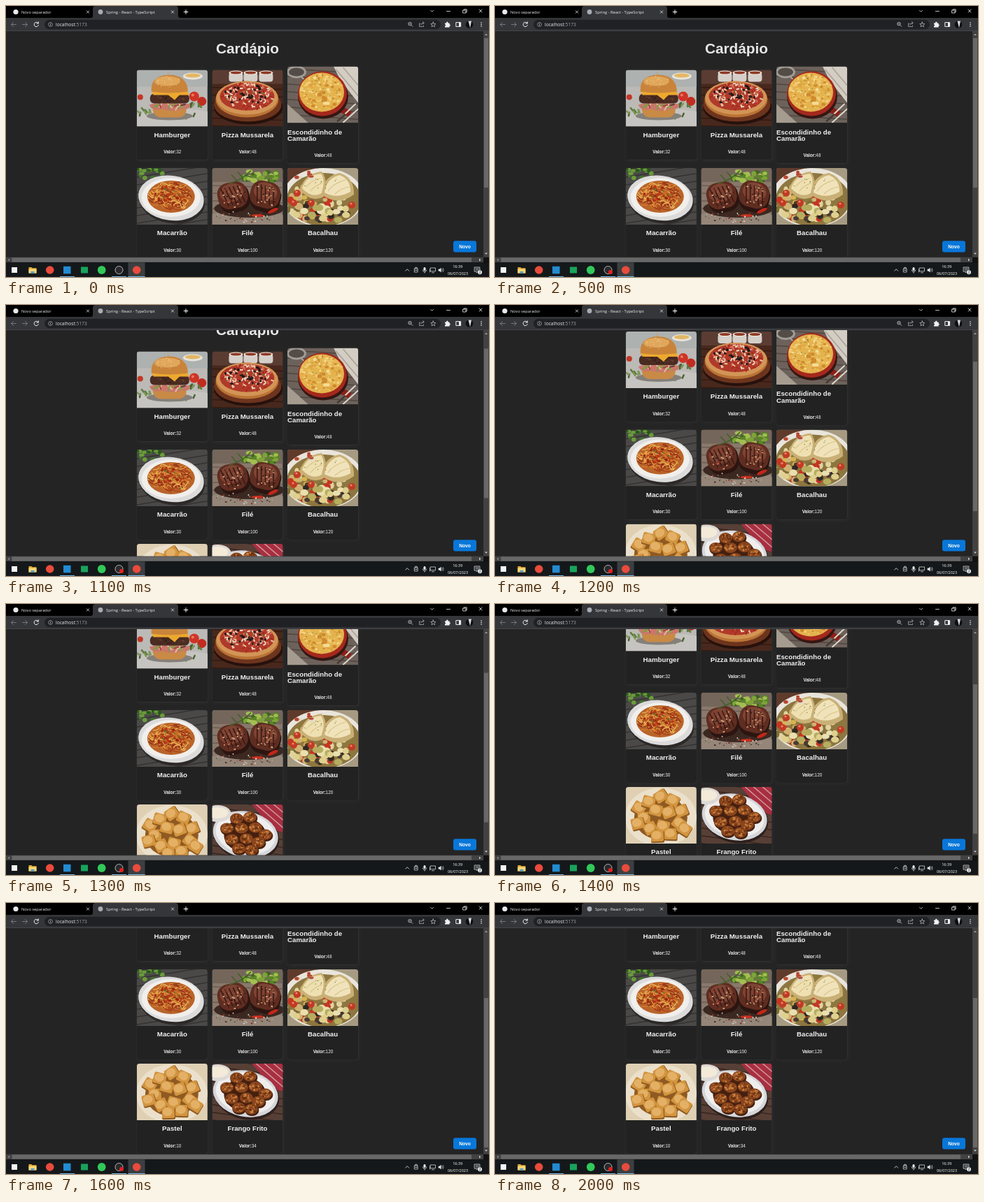
Write an HTML page that moves like this. It is 690 by 388 pixels and loops after 2.7 s.

```html
<!DOCTYPE html>
<html lang="pt">
<head>
<meta charset="utf-8">
<title>Cardápio</title>
<style>
html, body { margin: 0; width: 100%; height: 100%; overflow: hidden; background: #000; }
svg { display: block; width: 100vw; height: 100vh; }
text { font-family: "Open Sans", sans-serif; font-weight: 500; }
.page text { font-family: "Liberation Sans", Arial, sans-serif; font-weight: bold; }
.page .num { font-weight: normal; }
.line { fill: none; stroke-linecap: round; stroke-linejoin: round; }
</style>
</head>
<body>
<svg id="stage" viewBox="0 0 690 388"></svg>
<script>
let seed = 7;
const rnd = (a = 0, b = 1) => {
  seed = (seed * 16807) % 2147483647;
  return a + (b - a) * seed / 2147483647;
};
const pick = list => list[Math.floor(rnd(0, list.length))];

const rect = (x, y, w, h, fill, more = '') =>
  `<rect x="${x}" y="${y}" width="${w}" height="${h}" fill="${fill}" ${more}/>`;
const oval = (x, y, rx, ry, fill, more = '') =>
  `<ellipse cx="${x}" cy="${y}" rx="${rx}" ry="${ry}" fill="${fill}" ${more}/>`;
const dot = (x, y, r, fill, more) => oval(x, y, r, r, fill, more);
const shape = (d, fill, more = '') => `<path d="${d}" fill="${fill}" ${more}/>`;
const line = (d, color = '#e8eaed', w = 0.8) =>
  `<path class="line" d="${d}" stroke="${color}" stroke-width="${w}"/>`;
const text = (x, y, size, s, fill = '#fff', more = '') =>
  `<text x="${x}" y="${y}" font-size="${size}" fill="${fill}" ${more}>${s}</text>`;
const mid = 'text-anchor="middle"';
const turn = (a, x, y) => `transform="rotate(${a} ${x} ${y})"`;

// n pieces spread at random over an ellipse
function scatter(n, cx, cy, rx, ry, piece) {
  let out = '';
  for (let i = 0; i < n; i++) {
    const a = rnd(0, 6.283), r = Math.sqrt(rnd());
    out += piece(cx + rx * r * Math.cos(a), cy + ry * r * Math.sin(a));
  }
  return out;
}
const dots = (colors, lo, hi) => (x, y) => oval(x, y, rnd(lo, hi), rnd(lo, hi) * 0.85, pick(colors));
const bits = (colors, w, h) => (x, y) =>
  rect(x - w / 2, y - h / 2, w, h, pick(colors), 'rx="1" ' + turn(rnd(0, 180), x, y));
const planks = (base, seam, tilt) => {
  let out = rect(0, 0, 101, 81, base);
  for (let y = -30; y < 120; y += 11) out += line(`M-5 ${y}L106 ${y + tilt}`, seam, 1.5);
  return out;
};

// Each dish is painted on a 101 x 81 picture
function burger() {
  const leaf = bits(['#5d7a3a', '#7c9656', '#48642f'], 7, 2.5);
  return rect(0, 0, 101, 81, '#bbbab6') + rect(0, 0, 101, 24, '#adb1b0') +
    oval(60, 74, 70, 18, '#c6c4c0') +
    oval(80, 9, 14, 5, '#e9e4da') + oval(80, 8, 11, 3, '#e3b765') +
    dot(5, 39, 4, '#c33626') +
    dot(82, 38, 7, '#cf3426') + dot(93, 45, 6.5, '#c22c20') + dot(80, 36, 2, '#e97a60') +
    scatter(6, 78, 52, 13, 4, leaf) + scatter(7, 10, 62, 11, 6, leaf) + scatter(4, 74, 66, 14, 4, leaf) +
    oval(47, 66, 33, 6, '#85807a') +
    shape('M23 53H71Q72 67 60 68H35Q22 67 23 53Z', '#c98a45') +
    shape('M18 50Q30 45 76 49Q78 57 65 56Q50 61 36 56Q22 60 18 50Z', '#c9776b') +
    scatter(16, 47, 52, 27, 3, bits(['#7f9b45', '#a24340', '#e5b7a2', '#5c4030'], 8, 2)) +
    rect(19, 34, 56, 14, '#4b2c22', 'rx="6"') +
    scatter(24, 47, 41, 24, 5, dots(['#623c2c', '#372019'], 0.8, 2)) +
    shape('M21 31L72 30L75 36L61 36L54 43L45 36L24 36Z', '#eda92e') +
    shape('M21 31Q19 8 46 7Q73 8 73 31Q48 35 21 31Z', '#c9843a') +
    oval(44, 16, 18, 7, '#e0a75b') +
    scatter(22, 45, 17, 20, 8, dots(['#f0d8a4'], 0.4, 0.8)) + line('M45 2V7', '#c9a25a', 1);
}
function pizza() {
  return planks('#48281d', '#35190f', 3) + rect(0, 0, 101, 20, '#5b3c32') +
    [34, 55, 77].map(x => rect(x - 10, 4, 20, 13, '#d5cfca', 'rx="4"') +
      oval(x, 4, 10, 3, '#f2efeb') + oval(x, 4, 8, 2, '#8f3a25')).join('') +
    oval(52, 54, 49, 24, '#26110c') + oval(51, 50, 48, 24, '#6d341d') +
    oval(50, 42, 45, 26, '#b97335') + oval(50, 40, 44, 24, '#d29556') + oval(50, 38, 39, 20, '#b03a2a') +
    scatter(120, 50, 38, 38, 19, bits(['#e9c8a8', '#efdcc8', '#d8705a', '#a82a1d'], 5, 2)) +
    scatter(28, 50, 38, 35, 17, dots(['#211918', '#33211e'], 1.4, 2.6)) +
    scatter(9, 50, 38, 30, 14, dots(['#74793a'], 0.8, 1.5));
}
function gratin() {
  return planks('#6d625b', '#50463f', 7) + shape('M66 0H101V52L76 20Z', '#d3cdc3') +
    line('M70 5L101 42M80 2L101 27', '#aaa196', 1.5) +
    oval(13, 8, 14, 9, '#a09c96') + oval(13, 8, 11, 6, '#544c46') + line('M20 15L31 25', '#aaa69e', 2) +
    shape('M0 54L30 81H0Z', '#a59b8f') +
    shape('M70 52L92 65L87 72L62 58Z', '#8c2018') +
    oval(51, 43, 36, 32, '#351713') + oval(50, 39, 35, 32, '#a5281d') + oval(49, 37, 32, 28, '#e4b34d') +
    scatter(130, 49, 36, 30, 26, dots(['#f0cb73', '#dfa341', '#f5dc97', '#edc464', '#d08a2e'], 1, 3)) +
    scatter(14, 49, 36, 24, 20, dots(['#7b8237'], 0.5, 1)) +
    line('M72 78L97 54M80 80L101 61', '#dcd6cb', 2) + line('M72 78L82 69', '#463b33', 3);
}
function pasta() {
  return planks('#4b4948', '#343231', -18) +
    scatter(24, 16, 6, 23, 9, dots(['#42722b', '#6a9b3b', '#2c5320'], 2, 4)) +
    oval(51, 47, 47, 32, '#2c2928', turn(8, 50, 44)) +
    oval(49, 43, 47, 32, '#dcdbdb', turn(8, 50, 44)) + oval(49, 42, 42, 28, '#f1efec') +
    oval(49, 41, 34, 23, '#b9642a') +
    scatter(120, 49, 40, 28, 19, (x, y) =>
      line(`M${x - 6} ${y}q${rnd(0, 8)} ${rnd(-10, 10)} ${rnd(7, 13)} ${rnd(-5, 5)}`,
        pick(['#e6a043', '#d67c2c', '#f0b95c', '#a53c17', '#8f2c14']), 1.2)) +
    scatter(30, 49, 38, 24, 15, dots(['#98260f', '#b93618'], 1, 2.5)) +
    scatter(8, 50, 36, 18, 9, dots(['#4d7a2c'], 0.8, 1.5));
}
function steak() {
  const slab = (x, y, a) => `<g ${turn(a, x, y)}>` +
    rect(x - 21, y - 17, 44, 41, '#2c1510', 'rx="17"') + rect(x - 22, y - 20, 43, 38, '#5f2d21', 'rx="16"') +
    oval(x - 1, y - 5, 17, 13, '#7d4534') +
    [-12, -6, 0, 6, 12].map(d => line(`M${x + d - 3} ${y - 13}L${x + d + 3} ${y + 12}`, '#3d1c16', 1.8)).join('') +
    scatter(40, x, y, 18, 17, dots(['#b57555', '#8c3324', '#d0a078', '#35160f'], 0.5, 1.8)) + '</g>';
  return planks('#89796c', '#6c5d52', 3) + rect(0, 0, 101, 20, '#75665b') + oval(50, 74, 58, 15, '#95867a') +
    scatter(38, 70, 13, 27, 11, dots(['#7da436', '#5a8428', '#a2bf50', '#3e6420'], 2, 5)) +
    oval(53, 58, 50, 13, '#3a2821') + slab(76, 39, 14) + slab(30, 40, -12) +
    line('M25 22Q45 16 55 4M35 18L28 10M43 13L37 6M47 10L56 13', '#416128', 1.5) +
    oval(87, 61, 8, 2.5, '#bf2719', turn(-25, 87, 61)) + oval(65, 68, 9, 2, '#c9301f') +
    scatter(55, 48, 70, 47, 8, dots(['#d5c7b7', '#5a4436', '#b63622', '#3c2b22'], 0.5, 1.5));
}
function cod() {
  return rect(0, 0, 101, 81, '#a69b82') + shape('M0 0H45L0 27Z', '#5f3b2b') +
    oval(51, 42, 58, 42, '#e9e5dc') + oval(52, 45, 53, 38, '#8d763f') +
    scatter(45, 42, 50, 46, 25, dots(['#d8b44d', '#cfb273', '#7c6c35', '#c43522', '#e0d3a0'], 3, 6)) +
    shape('M18 31Q24 8 49 5Q59 17 52 41Q34 51 18 31Z', '#c9b076') +
    shape('M21 29Q27 10 48 8Q55 18 49 36Q35 44 21 29Z', '#efe0b2') +
    shape('M49 38Q51 11 75 7Q96 14 95 38Q72 55 49 38Z', '#c9b076') +
    shape('M53 35Q56 14 75 10Q91 17 90 34Q70 45 53 35Z', '#f0e3bb') +
    line('M27 27Q35 17 47 15M33 33Q40 24 50 22M58 33Q65 22 83 17M68 37Q78 28 89 27', '#d9c58a', 1.2) +
    scatter(12, 50, 22, 34, 12, dots(['#6a7b2d'], 0.4, 1)) +
    scatter(20, 49, 61, 40, 15, dots(['#302823', '#493b34'], 3.5, 5)) +
    scatter(17, 52, 64, 42, 13, dots(['#dfd08e', '#eadfae', '#b6ad61'], 4, 6)) +
    [[14, 36], [9, 50], [34, 50], [92, 53]].map(([x, y]) => dot(x, y, 5, '#c23a24') + dot(x - 1, y - 2, 1.6, '#e78869')).join('') +
    scatter(6, 24, 10, 14, 6, dots(['#e0d9cb', '#b74731'], 2, 4));
}
function pastry() {
  const spots = [[19, 30], [33, 21], [50, 13], [67, 19], [79, 34], [26, 44], [43, 33], [61, 36],
    [76, 52], [17, 52], [35, 59], [53, 56], [64, 67], [45, 70], [84, 60]];
  return rect(0, 0, 101, 81, '#dfd0b4') + oval(50, 43, 51, 42, '#ebe0cb') + oval(50, 44, 38, 31, '#8f5a22') +
    spots.map(([x, y]) => `<g ${turn(rnd(-35, 45), x, y)}>` +
      rect(x - 9, y - 7, 19, 17, '#8f5a22', 'rx="2"') + rect(x - 9, y - 8, 18, 16, '#d3953f', 'rx="2"') +
      oval(x - 1, y - 1, 7, 6, '#e3b066') + '</g>').join('');
}
function chicken() {
  const nuggets = [[35, 20], [54, 18], [21, 34], [42, 34], [62, 33], [76, 43], [28, 50], [49, 49],
    [66, 54], [38, 63], [56, 65]];
  return planks('#573f36', '#392720', 15) +
    shape('M57 0H101V40Q82 37 72 18Z', '#a82f40') +
    line('M63 0L101 33M75 0L101 22M88 0L101 11', '#d3959c', 1.6) +
    oval(50, 46, 47, 34, '#2e211d', turn(12, 50, 43)) + oval(48, 43, 47, 33, '#d5d6da', turn(12, 48, 42)) +
    oval(48, 42, 43, 29, '#efeeed', turn(12, 48, 41)) +
    oval(8, 13, 19, 12, '#dcd9d6') + oval(8, 12, 15, 8, '#f4ead8') + oval(47, 44, 30, 24, '#45200f') +
    nuggets.map(([x, y]) => oval(x + 1, y + 2, 10, 8, '#45200f') + oval(x, y, 9.5, 7.5, '#8a451e') +
      scatter(18, x, y, 7.5, 5.5, dots(['#b0632b', '#69300f', '#c7803f'], 0.8, 2.3))).join('');
}

const cols = [186.8, 294.4, 402], rows = [91.5, 232, 367];
const menu = [
  [burger, 'Hamburger', 32], [pizza, 'Pizza Mussarela', 48], [gratin, 'Escondidinho de|Camarão', 48],
  [pasta, 'Macarrão', 30], [steak, 'Filé', 100], [cod, 'Bacalhau', 120],
  [pastry, 'Pastel', 10], [chicken, 'Frango Frito', 34]
];
function card([dish, name, price], i) {
  const [first, second] = name.split('|'), extra = second ? 10 : 0;
  const title = second
    ? text(0, 97, 9.7, first, '#f0f0f0') + text(0, 106.5, 9.7, second, '#f0f0f0')
    : text(50.6, 96.2, 9.7, first, '#f0f0f0', mid);
  return `<g transform="translate(${cols[i % 3]} ${rows[Math.floor(i / 3)] - extra / 2})">` +
    rect(0, 0, 101.2, 129 + extra, '#242424', 'rx="4" filter="url(#shade)"') +
    `<g clip-path="url(#photo)">${dish()}</g>` + title +
    text(51, 119.8 + extra, 6.45, `Valor:<tspan class="num">${price}</tspan>`, '#f0f0f0', mid) + '</g>';
}

const cross = (x, y, r) => line(`M${x - r} ${y - r}l${2 * r} ${2 * r}m0 ${-2 * r}l${-2 * r} ${2 * r}`);

const browser =
  rect(0, 0, 690, 17, '#000') + rect(0, 17, 690, 19, '#35363a') +
  shape('M121 17Q124 17 124 14V4Q124 0 128 0H242Q246 0 246 4V14Q246 17 249 17Z', '#35363a') +
  dot(14, 8.5, 3.6, '#e8eaed') + text(22, 10.7, 5.7, 'Novo separador', '#eceef0') + cross(117, 8.5, 1.7) +
  dot(135, 8.5, 3.4, '#a9adb3') + text(143, 10.7, 5.75, 'Spring - React - TypeScript', '#f1f3f4') + cross(238, 8.5, 1.7) +
  line('M257 5.7v5.6M254.2 8.5h5.6', '#fff', 1) +
  line('M606.6 6.3l2 2 2-2M629.5 7.5h5M653 6h4v4h-4zM654.2 6v-1.2h4v4h-1.2') + cross(678, 7, 2) +
  line('M14.5 26.5h-7m3-3l-3 3 3 3', '#85888c') + line('M23.5 26.5h7m-3-3l3 3-3 3', '#85888c') +
  line('M46 24.6A3.2 3.2 0 1 0 46.4 27.5M46.3 22.8v2.2h-2.3', '#f1f3f4', 1) +
  rect(55, 19.8, 566, 13.4, '#202124', 'rx="6.7"') +
  dot(63.5, 26.5, 2.9, 'none', 'stroke="#aeb1b5" stroke-width=".7"') + line('M63.5 26.2v1.6M63.5 24.9v.1', '#c8cacd', 0.7) +
  text(71, 28.8, 6.65, 'localhost<tspan fill="#9aa0a6">:5173</tspan>', '#e8eaed') +
  dot(577, 25.6, 2.3, 'none', 'stroke="#c8cacd" stroke-width=".8"') + line('M578.8 27.4l2 2M576 25.6h2', '#c8cacd') +
  line('M592 25h-1.5v4.5h6V28M592.5 27.2q.5-3 4.5-3m-1.6-1.7l1.8 1.7-1.8 1.7', '#b9bcc0', 0.7) +
  line('M610.3 23l1 2.4 2.5.2-1.9 1.7.6 2.5-2.2-1.4-2.2 1.4.6-2.5-1.9-1.7 2.5-.2z', '#c8cacd', 0.7) +
  shape('M627 24.5h2q0-2 1.3-2t1.3 2h2v2q1.3 0 1.3 1t-1.3 1v2h-6.6v-2q1.3 0 1.3-1t-1.3-1z', '#f1f3f4') +
  line('M643.2 23.6h6.4v5.8h-6.4z', '#f1f3f4', 1) + rect(647, 23.6, 2.6, 5.8, '#f1f3f4') +
  dot(662, 26.5, 5.3, '#0d0e11') + shape('M660.5 21.5h4.5L663 31.5Z', '#d9dadc') +
  [-2.5, 0, 2.5].map(d => dot(679, 26.5 + d, 0.8, '#f1f3f4')).join('') + rect(0, 35.3, 690, 0.7, '#4b4c50');

const arrow = (x, y, a, fill) => shape(`M${x - 2} ${y + 1}h4l-2-2.3z`, fill, turn(a, x, y));
const bars =
  rect(682, 36, 8, 324, '#424242') + rect(0, 359.7, 682, 7.6, '#424242') +
  rect(8.5, 360.3, 656.5, 6.3, '#686868') + rect(682, 359.7, 8, 7.6, '#121212') +
  arrow(686, 41, 0, '#a5a5a5') + arrow(686, 354.5, 180, '#d0d0d0') +
  arrow(4, 363.5, -90, '#858585') + arrow(677, 363.5, 90, '#d0d0d0') +
  rect(683, 46, 6, 214, '#686868', 'id="thumb"');

const taskbar =
  rect(0, 367.3, 690, 20.7, '#15181a') + rect(174.5, 367.3, 24, 20.7, '#3c3f41') +
  rect(8, 374, 8, 8, '#f4f4f4') +
  shape('M32.5 374h4l1 1.3h6v7.2h-11z', '#e2aa34') + rect(32.5, 376.5, 11, 6, '#f8d775') + rect(35.5, 380, 5, 2.5, '#4a9bd6') +
  dot(62.7, 378, 5.8, '#e94b3c') + rect(82, 372.8, 10.5, 10.5, '#238bd2') +
  rect(107, 373.5, 10, 9, '#18a45b') + dot(136.7, 378, 5.9, '#32c85a') +
  dot(161.5, 378, 5.5, '#29292b', 'stroke="#c4c4c6" stroke-width=".9"') +
  dot(165, 381, 3, '#e52020', 'id="rec"') + dot(186.7, 378, 5.8, '#e94b3c') +
  rect(77, 387, 21, 1, '#76b9ed') + rect(151, 387, 21, 1, '#76b9ed') + rect(174.5, 387, 24, 1, '#76b9ed') +
  line('M570.7 379.2l2.5-2.5 2.5 2.5') +
  line('M583.7 376h4.4v5h-4.4zM584.6 376v-1.7h2.6v1.7M584.6 378.5h2.6', '#e8eaed', 0.7) +
  rect(596.5, 374, 3, 5, '#f1f1f1', 'rx="1.5"') + line('M595.3 378q0 2.5 2.7 2.5t2.7-2.5M598 380.5v1.7', '#f1f1f1', 0.7) +
  line('M606.5 375h7v4.8h-7zM608.5 381.8h3M605.5 377v4', '#e8eaed', 0.7) +
  shape('M617.7 376.7h1.7l2.2-2v6.8l-2.2-2h-1.7z', '#e8eaed') +
  line('M623 376.7q1 1.4 0 2.8M624.3 375.4q2 2.7 0 5.4', '#e8eaed', 0.6) +
  text(645.3, 375.4, 5.6, '16:39', '#fff', mid) + text(645.5, 385.4, 5.5, '06/07/2023', '#fff', mid) +
  line('M669.5 374h7.4v6.2h-3l-1.5 1.7v-1.7h-2.9zM671 376h4.4M671 378h4.4', '#f1f1f1', 0.7) +
  dot(677, 381.3, 3, '#e8e8e8') + text(677, 383.1, 4.8, '2', '#111', mid);

const stage = document.getElementById('stage');
stage.innerHTML = `<defs>
  <clipPath id="view"><rect y="36" width="682" height="323.7"/></clipPath>
  <clipPath id="photo"><path d="M0 81V4Q0 0 4 0H97.2Q101.2 0 101.2 4V81Z"/></clipPath>
  <filter id="shade" x="-10%" y="-10%" width="120%" height="120%">
    <feDropShadow dx="1" dy="1" stdDeviation="2" flood-color="#fff" flood-opacity=".04"/></filter>
  </defs>` + rect(0, 36, 690, 324, '#242424') +
  `<g class="page" clip-path="url(#view)"><g id="content">` +
  text(345, 67.7, 20.8, 'Cardápio', '#e6e6e6', mid) + menu.map(card).join('') + '</g>' +
  rect(639, 336.3, 33, 16.2, '#0877d9', 'rx="3"') + text(655.5, 346.9, 6.7, 'Novo', '#fff', mid) + '</g>' +
  browser + bars + taskbar;

const content = document.getElementById('content');
const thumb = document.getElementById('thumb');
const rec = document.getElementById('rec');
const wheel = [0.5, 25, 53.5, 80, 105, 126, 137];

function draw() {
  const t = performance.now() % 2700;
  const tick = Math.floor((t - 1000) / 100);
  const y = tick < 0 ? 0 : wheel[Math.min(tick, wheel.length - 1)];
  content.setAttribute('transform', `translate(0 ${-y})`);
  thumb.setAttribute('y', 46 + y * 90 / 137);
  rec.setAttribute('visibility', t < 100 ? 'hidden' : 'visible');
  requestAnimationFrame(draw);
}
draw();
</script>
</body>
</html>
```
